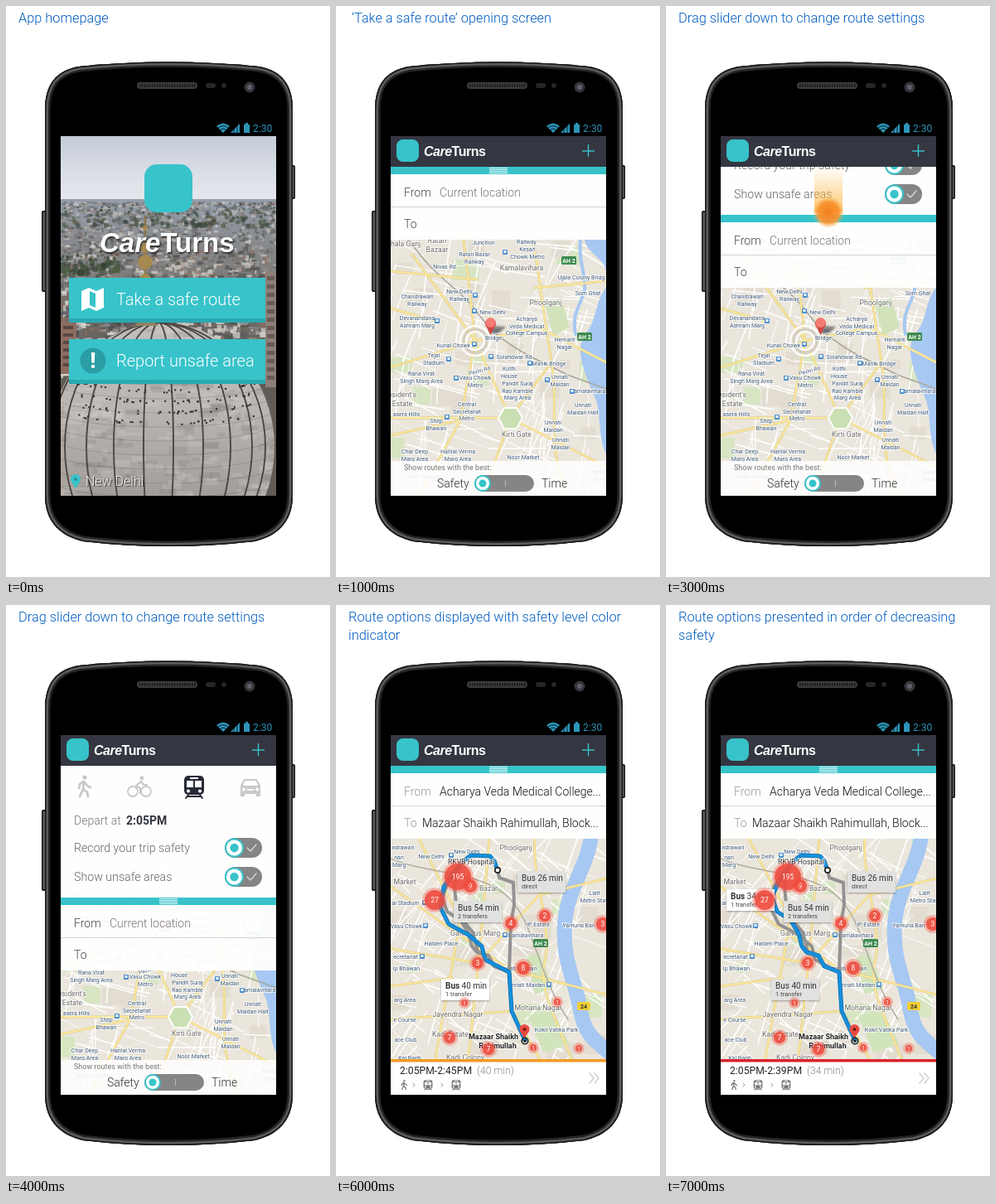
Animation, 391 px wide and 689 px high, one loop 8000 ms. Source, as an HTML page with a canvas:

```html
<!DOCTYPE html>
<html lang="en">
<head>
<meta charset="utf-8">
<title>Safe travel app walkthrough</title>
<style>
html, body { margin: 0; width: 100%; height: 100%; overflow: hidden; background: #fff; }
canvas { display: block; width: 391px; height: 689px; }
</style>
</head>
<body>
<canvas id="stage" width="391" height="689"></canvas>
<script>
const c = document.getElementById('stage').getContext('2d');
const TEAL = '#38c3ca', DARK = '#343641', GREY = '#777', BLUE = '#168fdc', WATER = '#a6c8f2';
const SANS = 'Roboto, sans-serif', BRAND = '"Liberation Sans", Arial, sans-serif';
const BODY = new Path2D('M47 125C47 95 60 78 88 73Q196 62 305 73C333 78 346 95 346 125V590C346 625 325 640 300 646Q196 658 93 646C68 640 47 625 47 590Z');

function seeded(seed) {
  return () => (seed = (seed * 16807) % 2147483647) / 2147483647;
}
function rect(x, y, w, h, color) {
  c.fillStyle = color;
  c.fillRect(x, y, w, h);
}
function round(x, y, w, h, r, color) {
  c.fillStyle = color;
  c.beginPath();
  c.roundRect(x, y, w, h, r);
  c.fill();
}
function disc(x, y, r, color) {
  c.fillStyle = color;
  c.beginPath();
  c.arc(x, y, r, 0, 7);
  c.fill();
}
function ring(x, y, r, color, width) {
  c.strokeStyle = color;
  c.lineWidth = width;
  c.beginPath();
  c.arc(x, y, r, 0, 7);
  c.stroke();
}
function stroke(d, color, width) {
  c.strokeStyle = color;
  c.lineWidth = width;
  c.lineJoin = c.lineCap = 'round';
  c.stroke(new Path2D(d));
}
function fill(d, color) {
  c.fillStyle = color;
  c.fill(new Path2D(d));
}
function text(s, x, y, size, color, weight = 300, align = 'left', family = SANS) {
  c.font = `${weight} ${size}px ${family}`;
  c.textAlign = align;
  c.fillStyle = color;
  c.fillText(s, x, y);
}
function vertical(y0, y1, ...stops) {
  const g = c.createLinearGradient(0, y0, 0, y1);
  stops.forEach((s, i) => g.addColorStop(i / (stops.length - 1), s));
  return g;
}
function shadow(color, dx, dy, blur) {
  c.shadowColor = color;
  c.shadowOffsetX = dx;
  c.shadowOffsetY = dy;
  c.shadowBlur = blur;
}
function local(x, y, scale, draw) {
  c.save();
  c.translate(x, y);
  c.scale(scale, scale);
  draw();
  c.restore();
}
function brand(x, y, size) {
  text('Care', x, y, size, '#fff', 'italic 700', 'left', BRAND);
  const w = c.measureText('Care').width;
  text('Turns', x + w, y, size, '#fff', 700, 'left', BRAND);
}

// Icons, centred on the given point
function walker(x, y, s, color) {
  local(x, y, s, () => {
    disc(1, -11, 2.6, color);
    stroke('M0 -6L-1 3L-5 12M-1 3L4 7L5 12M0 -6L-5 -3L-6 2M1 -5L4 -1L8 1', color, 2.8);
  });
}
function bike(x, y, color) {
  ring(x - 8, y + 6, 6, color, 1.8);
  ring(x + 8, y + 6, 6, color, 1.8);
  local(x, y, 1, () => {
    disc(3, -10, 2.4, color);
    stroke('M1 8V2L-4 -1L2 -6L5 -2H9', color, 2.2);
  });
}
function train(x, y, s, color) {
  local(x, y, s, () => {
    round(-12, -13, 24, 23, 5, color);
    rect(-5, -11, 10, 2, '#fff');
    rect(-9, -7, 8, 8, '#fff');
    rect(1, -7, 8, 8, '#fff');
    disc(-7, 5.5, 2, '#fff');
    disc(7, 5.5, 2, '#fff');
    stroke('M-7 10L-10 14M7 10L10 14M-8 12H8', color, 2);
  });
}
function car(x, y, color) {
  local(x, y, 1, () => {
    fill('M-8 -9H8L12 -1V9H-12V-1Z', color);
    fill('M-7 -7H7L9 -1H-9Z', '#fff');
    rect(-12, 8, 5, 4, color);
    rect(7, 8, 5, 4, color);
    disc(-8, 3.5, 2, '#fff');
    disc(8, 3.5, 2, '#fff');
    rect(-4, 3, 8, 2, '#fff');
  });
}
function knob(x, y, r) {
  disc(x, y, r, TEAL);
  disc(x, y, r - 2, '#fff');
  disc(x, y, r * 0.45, TEAL);
}
function toggle(y) {
  round(264, y - 12, 45, 24, 12, '#858585');
  knob(275.5, y, 11.5);
  stroke(`M291 ${y}l4 4l7 -8`, '#ddd', 1.2);
}

function sideKey(x, y, w, h) {
  round(x, y, w, h, 2, '#1c1c1c');
  rect(x + 1.5, y + 2, w - 3, h - 4, '#5a5a5a');
}
function phone() {
  sideKey(43, 247, 7, 98);
  sideKey(343, 192, 6, 41);
  c.fillStyle = '#000';
  c.fill(BODY);
  c.save();
  c.clip(BODY);
  [['#242424', 13], ['#5c5c5c', 8], ['#1a1a1a', 3]].forEach(([color, w]) => {
    c.strokeStyle = color;
    c.lineWidth = w;
    c.stroke(BODY);
  });
  c.restore();
  round(158, 92, 73, 8, 4, '#3c3c3c');
  for (let x = 161; x < 229; x += 3) rect(x, 94, 1.5, 4, '#181818');
  round(241, 93, 12, 6, 3, '#262626');
  disc(263, 96, 3, '#262626');
  disc(294, 98, 6.5, '#35363c');
  disc(294, 98, 3, '#60626b');
  const holo = '#2d94b8';
  fill('M262 153L254 145Q262 138 270 145Z', holo);
  stroke('M256 147Q262 142 268 147M258.5 149.5Q262 146.5 265.5 149.5', '#000', 0.8);
  fill('M271 153L282 142V153Z', holo);
  stroke('M275 148V153M279 144V153', '#000', 0.7);
  rect(287, 143, 7, 10, holo);
  rect(289, 141, 3, 2, holo);
  text('2:30', 298, 152, 12, holo, 400);
}

function skyline() {
  const rnd = seeded(77), pick = a => a[Math.floor(rnd() * a.length)];
  rect(66, 157, 260, 80, vertical(157, 237, '#c5cbd8', '#d9dde5', '#e6e8ec'));
  rect(66, 233, 260, 358, vertical(233, 420, '#959fab', '#7d7b78', '#615c57'));
  for (let i = 0; i < 2600; i++) {
    const t = rnd(), y = 236 + t ** 1.5 * 210, near = (y - 234) / 200;
    const color = pick(['#a9a39c', '#cfcbc6', '#6f6b6b', '#4a4847', '#8d6d60', '#495349', '#e2dfda', '#5d5a62', '#8c8b90']);
    c.globalAlpha = 0.4 + near * 0.5;
    rect(64 + rnd() * 262, y, 2 + rnd() * (4 + near * 8), 1.5 + rnd() * (2 + near * 6), color);
  }
  for (let i = 0; i < 230; i++) {
    const a = rnd(), left = rnd() < 0.35;
    c.globalAlpha = 0.6;
    disc(66 + rnd() * (left ? 70 : 260), (left ? 295 : 238) + a * 28, 1 + a * (left ? 3.5 : 2), pick(['#3a4a38', '#4d5b42', '#2f3e30']));
  }
  c.globalAlpha = 1;
  rect(66, 380, 19, 64, '#8d6d60');
  for (let y = 386; y < 440; y += 9) rect(69, y, 12, 4, '#5a4843');
  rect(313, 320, 13, 140, '#8c8078');
  for (let y = 326; y < 455; y += 10) rect(315, y, 9, 5, '#6b5b55');
}
function dome() {
  const rnd = seeded(31);
  c.save();
  c.beginPath();
  c.ellipse(188, 532, 136, 150, 0, 0, 7);
  c.clip();
  rect(50, 380, 280, 215, vertical(382, 591, '#c2beb9', '#bab5b0', '#a29d98'));
  for (let i = 0; i < 260; i++) {
    c.globalAlpha = 0.2;
    rect(55 + rnd() * 270, 385 + rnd() * 206, 5 + rnd() * 20, 3 + rnd() * 7, rnd() < 0.55 ? '#dedbd6' : '#77736d');
  }
  c.globalAlpha = 1;
  for (let y = 402; y < 640; y += 17) {
    c.beginPath();
    c.ellipse(188, y - 20, 140, 24, 0, 0, Math.PI);
    c.strokeStyle = 'rgba(90,84,78,.35)';
    c.lineWidth = 0.8;
    c.stroke();
  }
  [18, 54, 87, 113, 129].forEach(rx => {
    c.beginPath();
    c.ellipse(184, 532, rx, 150, 0, 0, 7);
    c.strokeStyle = '#4b4641';
    c.lineWidth = 1.9;
    c.stroke();
  });
  for (let i = 0; i < 130; i++) {
    const x = 85 + rnd() * 215;
    rect(x, 462 + Math.floor(rnd() * 4) * 13 + rnd() * 4 - (x - 190) ** 2 / 1200, 2.2, 2, '#35322f');
  }
  c.restore();
  stroke('M168 254V384', '#87744f', 2.5);
  [[268, 3], [292, 6], [309, 9], [330, 7]].forEach(([y, r]) => disc(168, y, r, '#a58a50'));
  fill('M155 386Q166 376 168 340Q171 376 184 386Z', '#90835f');
}
function button(y, label) {
  rect(76, y, 237, 54, '#2aa9b1');
  rect(76, y, 237, 49, TEAL);
  text(label, 133, y + 33, 20, '#fff', 300);
}
function home() {
  skyline();
  dome();
  round(167, 191, 58, 58, 15, TEAL);
  shadow('rgba(0,0,0,.65)', 1, 2, 2);
  brand(113, 297, 33);
  shadow('transparent', 0, 0, 0);
  button(328, 'Take a safe route');
  button(402, 'Report unsafe area');
  fill('M91 344L100 340L109 344L118 340V364L109 368L100 364L91 368Z', '#fff');
  fill('M101 344L108 347V364L101 361Z', TEAL);
  disc(105, 428, 15.5, '#2a9da5');
  text('!', 105, 437, 25, '#fff', 900, 'center');
  fill('M84 583C82 577 78 575 78 571A6 6 0 0 1 90 571C90 575 86 577 84 583Z', TEAL);
  disc(84, 571, 2, '#2a8f96');
  shadow('rgba(0,0,0,.7)', 1, 1, 1);
  text('New Delhi', 96, 579, 16, '#f4f2ef');
  shadow('transparent', 0, 0, 0);
}

function label(s, x, y, size = 7, color = '#3d5878', weight = 400) {
  const lines = s.split('|'), gap = size * 1.25;
  c.strokeStyle = 'rgba(255,255,255,.8)';
  c.lineWidth = 2;
  lines.forEach((t, i) => {
    const ty = y + (i - (lines.length - 1) / 2) * gap + size * 0.36;
    c.font = `${weight} ${size}px ${SANS}`;
    c.textAlign = 'center';
    c.strokeText(t, x, ty);
    text(t, x, ty, size, color, weight, 'center');
  });
}
function area(s, x, y) {
  label(s, x, y, 8.7, '#6b6b68');
}
function station(x, y) {
  round(x - 3, y - 3, 6, 6, 1, '#4b8fd0');
  rect(x - 1.5, y - 2, 3, 3, '#fff');
}
function highway(x, y) {
  round(x - 9, y - 5, 18, 10, 1.5, '#3d8b4f');
  text('AH 2', x, y + 2.6, 7, '#fff', 700, 'center');
}
function streets(seed, tilt) {
  const rnd = seeded(seed);
  rect(66, 194, 260, 397, '#ebe6dc');
  for (let i = 0; i < 24; i++) {
    rect(60 + rnd() * 240, 280 + rnd() * 290, 12 + rnd() * 25, 8 + rnd() * 20, i % 3 ? '#e3ddd1' : '#d7e5c3');
  }
  for (let i = 0; i < 150; i++) {
    const a = tilt + (i % 2) * Math.PI / 2 + (rnd() - 0.5) * 0.6, l = 20 + rnd() * 60;
    const x = 60 + rnd() * 250, y = 275 + rnd() * 310;
    stroke(`M${x} ${y}l${Math.cos(a) * l} ${Math.sin(a) * l}`, '#fff', 0.8 + rnd());
  }
}
function arterials(d) {
  stroke(d, '#d9c98a', 3);
  stroke(d, '#fbe79b', 2);
}

function cityMap() {
  streets(911, 0.25);
  fill('M300 282C304 300 324 304 326 320V282Z', WATER);
  fill('M326 340C312 356 316 378 301 396C286 416 302 446 314 476C320 496 316 520 326 540Z', WATER);
  stroke('M295 282C292 310 302 322 300 342C296 362 284 368 289 396', WATER, 4);
  fill('M252 360L272 352L282 388L262 398Z', '#d2e3bb');
  stroke('M88 282C120 330 150 340 172 372S230 422 282 446L326 462', '#aaa69d', 1.6);
  arterials('M168 404L66 436M168 404L92 300M168 404L154 282M168 404L245 388L326 430M168 404L210 497L326 556M168 404L150 500L66 518M210 497H66M210 497L178 591M210 497L260 430L238 282M66 365L120 380M240 340L326 332M150 500L100 591M260 430C270 480 252 530 280 591M66 320L170 330');
  ring(168, 404, 18, '#fff', 2.2);
  ring(168, 404, 11, '#fff', 2);
  ring(168, 404, 14, '#d4cec0', 3);
  fill('M196 497L203 485H218L225 497L218 510H203Z', '#cadfb2');
  stroke('M196 497L203 485H218L225 497L218 510H203Z', '#fff', 2);
  highway(281, 307);
  highway(300, 399);
  [['hala Ganj', 84, 287], ['Ratan|Bazaar', 122, 288], ['Kamalavihara', 224, 316], ['Phoolganj', 253, 358], ['Kirti Gate', 218, 517], ['esident\'s|Estate', 80, 474]].forEach(a => area(...a));
  [['Ratan Bazar|Railway', 167, 304], ['Junction', 178, 285], ['Railway', 230, 284], ['Kesari|Chowk Metro', 231, 298],
    ['Ujala Colony Bridg', 296, 327], ['Som Ghat', 304, 346], ['Nivas Rd', 131, 314], ['New Delhi|Railway', 149, 349],
    ['Chandrawari|Railway', 98, 355], ['New Delhi', 189, 369], ['Devanandana|Ashram Marg', 98, 381],
    ['Acharya|Veda Medical|College Campus', 230, 386], ['Tejal|Bridge', 190, 396], ['Hemant|Nagar', 276, 407],
    ['Kunal Chowk', 142, 409], ['Solahdwar Rd', 215, 423], ['Tejal|Stadium', 118, 426], ['Manik Bridge', 257, 431],
    ['Kothi|House', 209, 442], ['Rana Virat|Singh Marg Area', 103, 448], ['Vasu Chowk|Metro', 168, 453],
    ['Pandit Suraj|Rao Kamble|Marg Area', 219, 464], ['Unnati|Maidan', 270, 452], ['Kamalavihara', 304, 464],
    ['Central|Secretariat|Metro', 158, 489], ['asera Hills', 85, 492], ['Shilp|Bhawan', 121, 505], ['Unnati|Maidan Halt', 298, 486],
    ['Unnati|Maidan', 262, 507], ['Unnati|Maidan', 271, 528], ['Char Deep|Marg Area', 95, 542], ['Harilal Verma|Marg Area', 147, 542],
    ['Noor Market', 226, 544], ['Miller|Park', 318, 567], ['Race Course', 105, 567]].forEach(a => label(...a));
  [[204, 297], [168, 349], [122, 380], [167, 368], [167, 408], [187, 423], [234, 431], [145, 449], [285, 465], [134, 496], [136, 426], [255, 451]].forEach(p => station(...p));
  c.save();
  c.translate(173, 440);
  c.rotate(-0.25);
  label('Pavlin Rd', 0, 0, 6.5);
  c.restore();
  c.save();
  c.globalAlpha = 0.55;
  c.filter = 'blur(1px)';
  fill('M186 395L191 386L205 387L198 394Z', '#333');
  c.restore();
  fill('M186.5 397L182 388A6.5 6.5 0 1 1 191 388Z', '#cf4745');
  disc(186.5, 382, 6, '#f47b72');
}

function appBar() {
  rect(66, 157, 260, 37, DARK);
  round(73, 161, 27, 27, 8, TEAL);
  c.letterSpacing = '-0.5px';
  brand(106, 181, 16);
  c.letterSpacing = '0px';
  rect(297, 174.3, 15, 1.4, TEAL);
  rect(303.8, 167, 1.4, 15, TEAL);
}
function settings(dy) {
  walker(94, 219 + dy, 1, '#c9c9c9');
  bike(161, 219 + dy, '#c9c9c9');
  train(227, 219 + dy, 1, '#292b37');
  car(295, 219 + dy, '#c9c9c9');
  text('Depart at', 82, 265 + dy, 14, GREY);
  text('2:05PM', 145, 265 + dy, 14, DARK, 700);
  text('Record your trip safety', 82, 298 + dy, 14.2, '#666');
  text('Show unsafe areas', 82, 333 + dy, 14.2, '#666');
  toggle(293 + dy);
  toggle(328 + dy);
}
function panel(drop, from, to) {
  rect(66, 194, 260, drop, 'rgba(255,255,255,.97)');
  if (drop) settings(drop - 159);
  const y = 194 + drop;
  rect(66, y, 260, 9, TEAL);
  for (let i = 0; i < 4; i++) rect(185, y + 1 + i * 2, 22, 1, '#e5f7f7');
  rect(66, y + 9, 260, 79, 'rgba(255,255,255,.95)');
  rect(66, y + 48, 260, 1, '#d4d4d4');
  text('From', 82, y + 36, 14, to ? '#999' : '#444');
  text('To', 82, y + 74, 14, to ? '#999' : '#444');
  text(from, 125, y + 36, 14, to ? '#111' : GREY);
  if (to) text(to, 104, y + 74, 14, '#111');
}
function preference() {
  rect(66, 549, 260, 42, 'rgba(255,255,255,.86)');
  text('Show routes with the best:', 82, 560, 9, GREY, 400);
  text('Safety', 122, 581, 14, '#333');
  text('Time', 248, 581, 14, '#333');
  round(167, 566, 72, 20, 10, '#858585');
  rect(204, 572, 1, 8, '#bbb');
  knob(177, 576, 10);
}
function finger(y, trail) {
  if (trail) rect(179, y - trail, 34, trail, vertical(y - trail, y, 'rgba(255,190,70,0)', 'rgba(255,178,60,.75)'));
  const g = c.createRadialGradient(196, y, 2, 196, y, 19);
  g.addColorStop(0, '#f58220');
  g.addColorStop(0.65, 'rgba(248,145,45,.9)');
  g.addColorStop(1, 'rgba(255,185,90,0)');
  disc(196, y, 19, g);
}
function planner(drop, touch) {
  cityMap();
  panel(drop, 'Current location');
  preference();
  if (touch) finger(touch, drop && 56);
  appBar();
}

const START = 'M195 320L191 309L186 303L163 302L150 312';
const FINISH = 'L209 443L212 490L228 525';
const ROUTES = {
  26: 'M214 335L215 362L211 384' + FINISH,
  34: START + 'L137 332L128 352L134 370L150 380L160 396L164 412L170 419L184 423L191 436' + FINISH,
  40: START + 'L130 340L126 365L136 385L160 398L176 412L180 428' + FINISH,
  54: START + 'L143 340L146 372L165 395L171 418L184 424L191 436' + FINISH
};
function tag(x, y, min, note, active) {
  shadow('rgba(0,0,0,.35)', 0, 1, 2);
  rect(x, y, 58, 26, active ? '#fff' : '#e1e1df');
  shadow('transparent', 0, 0, 0);
  text('Bus', x + 5, y + 12, 10, '#333', active ? 700 : 400);
  text(`${min} min`, x + 5 + c.measureText('Bus ').width, y + 12, 10, '#333', 400);
  text(note, x + 5, y + 21, 7.5, '#444', 400);
}
function cluster(n, x, y, r) {
  disc(x, y, r + 3, 'rgba(240,80,65,.35)');
  disc(x, y, r, 'rgba(238,75,62,.88)');
  text(n, x, y + 3, r > 5 ? 8.5 : 7, '#fff', 400, 'center');
}
function routeMap(min) {
  streets(4242, 0.55);
  stroke('M309 270C306 315 279 340 276 385S288 450 294 485S312 525 336 545', WATER, 18);
  fill('M230 425L246 420L262 462L240 470Z', '#d1e4bb');
  fill('M232 495L262 490L282 530L250 540Z', '#d1e4bb');
  arterials('M66 340L126 382L210 440L326 470M66 415L172 432L245 350L326 330M100 282L150 380L112 591M66 500L213 490L270 591M172 432L155 591M240 282C236 330 262 390 252 430S278 520 300 591M185 282L172 432M66 460L140 450');
  stroke('M66 306C110 325 170 320 205 350S240 440 280 500', '#b0aca3', 1.5);
  highway(247, 408);
  round(291, 479, 16, 10, 2, '#f2cf35');
  text('24', 299, 487, 7, '#333', 700, 'center');
  [['Phoolganj', 217, 293], ['Market', 83, 334], ['Jayendra Nagar', 147, 494], ['Mohana Nagar', 244, 486], ['Kadi Estate', 138, 518], ['Kadi Colony', 156, 546], ['Galvanius Marg', 168, 396]].forEach(a => area(...a));
  [['ndrawari', 81, 292], ['New Delhi', 115, 303], ['New Delhi', 158, 297], ['nan|Marg', 76, 309], ['al Stadium', 84, 359], ['Vasu Chowk', 85, 387],
    ['Halden Place', 127, 408], ['ecretariat', 84, 424], ['lp Bhawan', 85, 438], ['IP Estate', 244, 385], ['Kamalavihara', 229, 398], ['Lalit|Metro Stati', 312, 352],
    ['Yamuna Ban', 293, 386], ['Unnati Maidan', 220, 438], ['Unnati Maidan', 230, 458], ['arg Area', 83, 476], ['e Course', 83, 500],
    ['Kokil Vatika Park', 266, 512], ['ace Club', 84, 524], ['Kal Bagh', 89, 546]].forEach(a => label(...a));
  [[139, 302], [107, 359], [108, 387], [104, 424], [204, 398], [257, 458]].forEach(p => station(...p));

  Object.keys(ROUTES).filter(k => k != min).forEach(k => stroke(ROUTES[k], '#929292', 4));
  if (min !== 26) stroke('M195 320L197 329L214 335', '#929292', 4);
  stroke(ROUTES[min], '#0870b2', 5);
  stroke(ROUTES[min], BLUE, 3.5);
  if (min === 26) {
    for (let i = 0; i < 5; i++) disc(194 + i * 3.4, 327 + i * 1.5, 2, BLUE);
    disc(214, 335, 3.5, '#333');
    disc(214, 335, 2, '#fff');
  } else {
    label('RKVB Hospital', 163, 310, 8.7, '#333');
    area('Bazar', 184, 342);
  }
  disc(195, 320, 4, '#222');
  disc(195, 320, 2.3, '#fff');
  if (min === 34) tag(73, 343, 34, '1 transfer', true);
  tag(219, 321, 26, 'direct', min === 26);
  tag(142, 357, 54, '2 transfers', false);
  tag(127, 451, 40, '1 transfer', min === 40);
  label('Mazaar Shaikh', 190, 521, 9, '#222', 700);
  label('Rahimullah', 195, 532, 9, '#222', 700);
  [[27, 119, 356, 12], [9, 162, 339, 8], [195, 147, 328, 16], [4, 211, 384, 7], [2, 252, 375, 7], [3, 322, 385, 8], [3, 171, 432, 7], [8, 226, 438, 8],
    [7, 137, 522, 7], [7, 184, 536, 7], [1, 155, 480, 4], [1, 267, 479, 4], [1, 238, 534, 4], [1, 293, 535, 4]].forEach(a => cluster(...a));
  fill('M227 523L223 516A6 6 0 1 1 232 516Z', '#e94b40');
  disc(227.5, 512, 2, '#6f1712');
  ring(228, 526, 3.8, '#222', 1.6);
  disc(228, 526, 1.7, '#222');
}
function results(min, color, arrival, buses) {
  routeMap(min);
  panel(0, 'Acharya Veda Medical College...', 'Mazaar Shaikh Rahimullah, Block...');
  rect(66, 548, 260, 43, '#fff');
  rect(66, 548, 260, 3.5, color);
  text(`2:05PM-${arrival}`, 77, 566, 12.2, '#222', 400);
  text(`(${min} min)`, 170, 566, 12.2, '#888');
  walker(82, 579, 0.45, '#777');
  for (let i = 0; i < buses; i++) {
    stroke(`M${93 + i * 34} 577l2 2l-2 2`, '#999', 1);
    train(111 + i * 34, 579, 0.45, '#777');
  }
  stroke('M306 565l5 6l-5 6M312 565l5 6l-5 6', '#ccc', 1.3);
  appBar();
}

const DRAG = ['Drag slider down to change route settings'];
const OPTIONS = ['Route options displayed with safety level color', 'indicator'];
const scenes = [
  [['App homepage'], home],
  [['‘Take a safe route’ opening screen'], () => planner(0)],
  [DRAG, () => planner(0, 199)],
  [DRAG, () => planner(58, 249)],
  [DRAG, () => planner(159)],
  [OPTIONS, () => results(26, '#f6d91d', '2:31PM', 1)],
  [OPTIONS, () => results(40, '#f39a24', '2:45PM', 2)],
  [['Route options presented in order of decreasing', 'safety'], () => results(34, '#d9232e', '2:39PM', 2)]
];

let shown = -1;
const began = performance.now();
function tick() {
  const index = Math.floor((performance.now() - began) / 1000) % scenes.length;
  if (index !== shown) {
    shown = index;
    const [caption, draw] = scenes[index];
    rect(0, 0, 391, 689, '#fff');
    caption.forEach((s, i) => text(s, index === 1 ? 19 : 15, 20 + i * 22, 16.35, '#005cc0'));
    phone();
    c.save();
    c.beginPath();
    c.rect(66, 157, 260, 434);
    c.clip();
    draw();
    c.restore();
  }
  requestAnimationFrame(tick);
}
tick();
</script>
</body>
</html>
```
